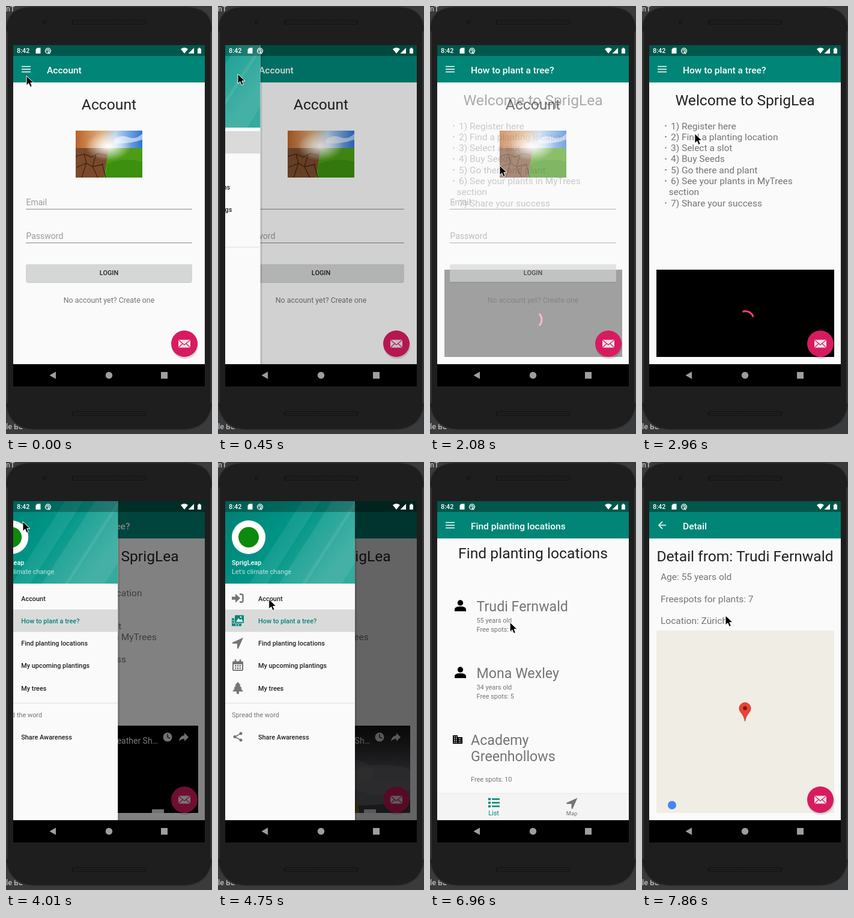
Animation of 343x711 px, one loop 8 s. Source, as an HTML page:

```html
<!DOCTYPE html>
<html lang="en">
<head>
<meta charset="utf-8">
<title>Tree planting app</title>
<style>
html, body { margin: 0; width: 100%; height: 100%; overflow: hidden; background: #3a3b3d; }
svg { display: block; width: 343px; height: 711px; font-family: Roboto, sans-serif; }
</style>
</head>
<body>
<svg id="stage" viewBox="0 0 343 711"></svg>
<script>
const LOOP = 8000, STEP = LOOP / 54;
const DARK = '#212121', GREY = '#757575', TEAL = '#008577', PINK = '#d81b60';

// Markup helpers; a label's y is the middle of its capitals.
const label = (x, y, size, str, fill = GREY, attrs = '') =>
  `<text x="${x}" y="${y + size * .355}" font-size="${size}" fill="${fill}" ${attrs}>${str}</text>`;
const centred = (y, size, str, fill, attrs = '') => label(171.5, y, size, str, fill, 'text-anchor="middle" ' + attrs);
const medium = 'font-weight="500"';
const box = (x, y, w, h, fill, attrs = '') => `<rect x="${x}" y="${y}" width="${w}" height="${h}" fill="${fill}" ${attrs}/>`;
const disc = (x, y, r, fill, attrs = '') => `<circle cx="${x}" cy="${y}" r="${r}" fill="${fill}" ${attrs}/>`;
const path = (d, fill, attrs = '') => `<path d="${d}" fill="${fill}" ${attrs}/>`;
const line = (d, stroke, width, attrs = '') => path(d, 'none', `stroke="${stroke}" stroke-width="${width}" ${attrs}`);
const group = (id, content, attrs = '') => `<g id="${id}" ${attrs}>${content}</g>`;
const at = (x, y, content) => `<g transform="translate(${x} ${y})">${content}</g>`;
const gradient = (id, stops, attrs = '') => `<linearGradient id="${id}" ${attrs}>` +
  stops.map(([offset, color]) => `<stop offset="${offset}" stop-color="${color}"/>`).join('') + '</linearGradient>';
const clip = (id, x, y, w, h) => `<clipPath id="${id}">${box(x, y, w, h, '#000')}</clipPath>`;

const arrowIcon = 'M9-9L-9-1Q-10 1-8 1H-1V8Q-1 10 1 9Z';
const icons = [
  c => path('M-10-2.5h6v-5l8 7.5-8 7.5v-5h-6z', c) + line('M3-6.5h3q2.5 0 2.5 2.5v8q0 2.5-2.5 2.5h-3', c, 2.5),
  c => box(-5, -9, 15, 13, c, 'rx="1"') + path('M-10-4h4v9h12v4h-16z', c) +
    path('M-3 2l4-6 3 3 2-2 3 5z', '#fafafa') + disc(5, -6, 1.3, '#fafafa') +
    line('M-8-1v2m0 2v2m4 2h2m2 0h2', '#fafafa', 1.4),
  c => path(arrowIcon, c),
  c => box(-9, -7, 18, 16, c, 'rx="2"') + box(-7, -2, 14, 9, '#fafafa') + line('M-4-10v4M4-10v4', c, 2.5) +
    line('M-5 0.5h10M-5 4.5h10', c, 2.5, 'stroke-dasharray="2.4 1.4"'),
  c => path('M0-10l5 6h-2l4 5h-2l4 5h-7v4h-4v-4h-7l4-5h-2l4-5h-2z', c),
];
const shareIcon = line('M5-5.5L-5 0 5 5.5', GREY, 1.6) + disc(5, -5.5, 2.5, GREY) + disc(-5, 0, 2.5, GREY) + disc(5, 5.5, 2.5, GREY);
const menu = ['Account', 'How to plant a tree?', 'Find planting locations', 'My upcoming plantings', 'My trees'];
const rowTop = i => 207.8 + i * 37.25;

const speaker = y => box(109, y - 4, 125, 8, '#151515', 'rx="4"') +
  line(`M113 ${y - 1.5}H231M113 ${y + 1.5}H231`, '#303030', 1.5, 'stroke-dasharray="1.5 1.5"');

const phone = label(0, 5, 12.5, 'nT', '#bbb', medium) + label(0, 699, 12.5, 'le Bu', '#bbb', medium) +
  path('M0 32Q5 2 42 1H301Q338 2 343 32V664Q337 702 298 704H45Q6 702 0 664Z', '#1e1e1e', 'stroke="#343434" stroke-width="2"') +
  line('M1.5 42V660M341.5 42V660', '#3a3a3a', 2) + disc(64, 27, 3, '#121212') + disc(64, 27, 1.2, '#2c2c2c') +
  speaker(27) + speaker(677);

const photo = '<g clip-path="url(#photoClip)">' + box(116, 207, 111, 78, 'url(#photoSky)') +
  path('M116 236H171V285H116Z', '#7a4a2b') + path('M171 236H227V285H163Z', '#4c9c16') +
  line('M116 250l14-4 12 5 11-6 14 3M118 268l16-7 10 6 18-4M130 246l4 15-8 24M150 246l-6 21 9 18M160 262l6 23', '#3d2214', 1.3) +
  path('M180 222q12-9 24-4t23-6v10q-24 8-47 6z', '#fff', 'opacity=".55"') +
  path('M168 262q30-12 59-3v26H166z', '#358a0c', 'opacity=".7"') +
  '<ellipse cx="170" cy="233" rx="38" ry="24" fill="url(#glow)"/></g>';

const field = (y, str) => label(33.5, y, 14, str, '#9b9b9b') + box(33, y + 11, 277, 1, '#888');
const account = centred(163, 24.7, 'Account', DARK) + photo + field(326, 'Email') + field(382, 'Password') +
  box(34, 431, 275, 29, '#000', 'rx="2" opacity=".18"') + box(33, 429, 277, 29.5, '#d5d6d6', 'rx="2"') +
  centred(443, 10.9, 'LOGIN', DARK, medium) + centred(489, 12.4, 'No account yet? Create one');

const steps = ['1) Register here', '2) Find a planting location', '3) Select a slot', '4) Buy Seeds',
  '5) Go there and plant', '6) See your plants in MyTrees', 'section', '7) Share your success'];
const stepLine = (str, i) => {
  const y = 199 + i * 18.3;
  return str === 'section' ? label(44.5, y, 15.5, str) : disc(39.5, y, 1.2, GREY) + label(48, y, 15.5, str);
};
const scene = box(24, 438, 296, 145, 'url(#storm)') +
  [[60, 520, 58], [130, 535, 50], [205, 515, 54], [275, 528, 60]].map(([x, y, r]) =>
    `<ellipse cx="${x}" cy="${y}" rx="${r}" ry="${r * .42}" fill="#b3b2ba" opacity=".6"/>`).join('') +
  path('M24 572q60-12 140-4t156-6v22H24z', '#62636a') +
  [90, 150, 222, 231].map(x => path(`M${x} 556l4 27h-8z`, '#b8a334')).join('');
const player = group('scene', scene) + box(24, 438, 296, 145, 'url(#shade)') +
  disc(47, 463, 14, '#777') + label(253, 463, 14, 'A Short Story of Weather Sh…', '#eee', 'text-anchor="end"') +
  disc(269, 457, 7.5, '#ddd') + line('M269 452v5l4 2', '#333', 1.6) +
  path('M297 450l7 7-7 7v-4q-6 0-9 4 1-9 9-10z', '#ddd') + box(243, 577, 20, 6, '#ddd');
const howTo = centred(156.5, 24.6, 'Welcome to SprigLea', DARK) + steps.map(stepLine).join('') +
  '<g clip-path="url(#videoClip)">' + box(24, 438, 296, 145, '#000') + group('player', player) +
  group('spinner', line('M181.9 511.1A14 14 0 0 1 181.9 530.9', '#ff4081', 3)) + '</g>';

const person = disc(0, -5, 4.7, '#000') + path('M-9.5 9V6Q-9.5 1 0 1T9.5 6V9Z', '#000');
const host = (y, name, age, spots) => at(50.5, y - 1, person) + label(77.5, y, 23.2, name) +
  label(77.5, y + 23, 10.9, age + ' years old') + label(77.5, y + 38, 10.9, 'Free spots: ' + spots);
const office = path('M-8-7H0V-4H8V7H-8Z', '#000') +
  line('M-6-4.5H-1M-6-1.5H-1M-6 1.5H-1M-6 4.5H-1M2-1.5H6M2 1.5H6M2 4.5H6', '#fff', 1.3, 'stroke-dasharray="1.6 1.4"');
const list = centred(151, 24.7, 'Find planting locations', DARK) +
  host(240, 'Trudi Fernwald', 55, 7) + host(351, 'Mona Wexley', 34, 5) +
  at(46, 461, office) + label(68, 462, 23.2, 'Academy') + label(68, 489, 23.2, 'Greenhollows') +
  label(68, 527, 10.9, 'Free spots: 10') +
  box(12, 550, 319, 45, '#f4f4f4') + box(12, 550, 319, 1, '#e8e8e8') +
  line('M97 560h4M97 566h4M97 572h4', TEAL, 3.5) + line('M103 560h13M103 566h13M103 572h13', TEAL, 2.5) +
  label(106, 583, 10.9, 'List', TEAL, 'text-anchor="middle"') +
  at(236.5, 567, path(arrowIcon, GREY)) + label(236, 584, 9.3, 'Map', GREY, 'text-anchor="middle"');

const detail = centred(156.5, 24.6, 'Detail from: Trudi Fernwald', DARK) +
  label(31, 190.5, 15.5, 'Age: 55 years old') + label(31, 227, 15.5, 'Freespots for plants: 7') +
  label(31, 263.5, 15.5, 'Location: Zürich') + box(24, 280, 296, 303, '#f0ede5') +
  path('M171.5 431Q170 422 164.500 416A9.700 9.700 0 1 1 178.500 416Q173 422 171.500 431Z', '#ea4335', 'stroke="#b8281c" stroke-width=".6"') +
  disc(171.5, 409, 3.3, '#7d1610') + disc(50, 570, 7, '#4285f4');

const fab = disc(1, 3, 22.3, '#000', 'opacity=".13"') + disc(0, 0, 22, PINK) +
  box(-10, -6.500, 20, 13, '#e9e4e6', 'rx="1"') + line('M-9.500-6L0 2 9.500-6M-9.500 6L-3 0M9.500 6L3 0', PINK, 1.2);

const drawer = box(216, 65, 3, 530, '#000', 'opacity=".12" transform="translate(12)"') +
  box(12, 65, 216, 530, '#fafafa') + box(12, 65, 216, 137, 'url(#header)') +
  [[228, 66], [190, 44], [140, 30]].map(([x, w]) =>
    path(`M${x} 65h${w}L${x + w - 88} 202h${-w}Z`, '#fff', 'opacity=".08" clip-path="url(#headerClip)"')).join('') +
  box(12, 65, 216, 18, '#000', 'opacity=".28"') +
  disc(51, 125, 28, '#fff') + disc(51, 125, 17, '#0b8a0b') +
  label(23, 167, 10.9, 'SprigLeap', '#fff', medium) + label(23, 182.5, 10.9, "Let's climate change", '#c3e4e0') +
  box(12, 0, 216, 37.25, '#dadada', 'id="highlight"') + box(12, 0, 216, 37.25, '#000', 'id="ripple"') +
  menu.map((str, i) => `<g class="item" color="${DARK}">` +
    at(33, rowTop(i) + 18.5, `<g class="icon" color="${GREY}">${icons[i]('currentColor')}</g>`) +
    label(67, rowTop(i) + 19, 10.9, str, 'currentColor', medium) + '</g>').join('') +
  box(12, 400, 216, 1, '#dfdfdf') + label(23, 420, 10.9, 'Spread the word') +
  at(33, 456.500, shareIcon) + label(67, 457, 10.9, 'Share Awareness', DARK, medium);

const status = label(18, 74.5, 10.9, '8:42', '#fff', medium) +
  path('M52 69.500h5.500v9.500h-8v-7z', '#fff') + disc(70, 74.500, 4.400, 'none', 'stroke="#fff" stroke-width="1.4"') +
  line('M68 74.500a2 2 0 1 1 2 2l3 3', '#fff', 1.3) +
  path('M291 71.500q6-4.500 12 0l-6 7.500z', '#fff') + path('M313 69.500v9.500h-9.500z', '#fff') + path('M319 71h1.500v-1.500h3v1.500h1.500v8h-6z', '#fff');

const stage = document.getElementById('stage');
stage.innerHTML = '<defs>' + clip('screenClip', 12, 65, 319, 530) + clip('photoClip', 116, 207, 111, 78) +
  clip('videoClip', 24, 438, 296, 145) + clip('headerClip', 12, 65, 216, 137) +
  gradient('photoSky', [[0, '#b9622a'], [.4, '#e0b07e'], [.6, '#b8d4f0'], [1, '#2f74cf']]) +
  gradient('storm', [[0, '#55555c'], [.5, '#8d8c95'], [1, '#9b9aa2']], 'x2="0" y2="1"') +
  gradient('shade', [[0, '#0009'], [.5, '#0000']], 'x2="0" y2="1"') +
  gradient('header', [[0, '#007f72'], [.55, '#009688'], [1, '#35aa9e']], 'y2=".5"') +
  '<radialGradient id="glow"><stop stop-color="#fff"/><stop offset="1" stop-color="#fff" stop-opacity="0"/></radialGradient></defs>' +
  phone + box(12, 65, 319, 567, '#000') +
  '<g clip-path="url(#screenClip)">' + box(12, 65, 319, 530, '#fafafa') +
  group('detail', detail) + group('list', list) + group('howTo', howTo) + group('account', account) + group('fab', fab) +
  box(12, 83, 319, 44, TEAL) + box(12, 65, 319, 18, '#00574b') +
  line('', '#fff', 1.7, 'id="navIcon"') + label(68, 106, 15.5, '', '#fff', medium + ' id="title"') +
  box(12, 65, 319, 530, '#000', 'id="scrim"') + group('drawer', drawer) + status + '</g>' +
  path('M83 607.500v12l-10.500-6z', '#9e9e9e') + disc(171.500, 613.500, 5.700, '#9e9e9e') + box(258, 608, 11, 11, '#9e9e9e') +
  path('M0 0V16L3.800 12.500 6.300 18.500 9.300 17.200 6.800 11.500H12Z', '#000', 'id="cursor" stroke="#fff" stroke-width="1"');

const el = Object.fromEntries([...stage.querySelectorAll('[id]')].map(node => [node.id, node]));
const items = [...stage.querySelectorAll('.item')];
const set = (node, attrs) => { for (const key in attrs) node.setAttribute(key, attrs[key]); };

const ramp = (t, start, duration) => Math.min(1, Math.max(0, (t - start) / duration));
const easeOut = (t, start) => 1 - (1 - ramp(t, start, 400)) ** 5;
const smooth = u => u * u * (3 - 2 * u);

// Cursor stops: time, x, y
const stops = [[0, 34, 116], [148, 33, 113], [740, 33, 113], [1334, 116, 265], [2400, 116, 265], [3500, 28, 99],
  [4300, 28, 99], [5037, 116, 299], [6520, 116, 299], [6960, 139, 255], [LOOP, 139, 255]];
function cursorAt(t) {
  const i = Math.max(1, stops.findIndex(stop => stop[0] >= t));
  const [t0, x0, y0] = stops[i - 1], [t1, x1, y1] = stops[i];
  const u = smooth(ramp(t, t0, t1 - t0));
  return [x0 + (x1 - x0) * u, y0 + (y1 - y0) * u];
}

function draw(now) {
  const t = Math.floor(now % LOOP / STEP + 1e-6) * STEP;

  const toHowTo = ramp(t, 1965, 300), toList = ramp(t, 5850, 300), toDetail = ramp(t, 7480, 300);
  const opacity = { account: 1 - toHowTo, howTo: toHowTo - toList, list: toList - toDetail, detail: toDetail };
  for (const id in opacity) set(el[id], { opacity: opacity[id] });
  set(el.fab, { transform: `translate(297 561) scale(${1 - opacity.list})` });

  const loaded = t >= 2900;
  set(el.player, { opacity: +loaded });
  set(el.scene, { opacity: ramp(t, 4350, 600) });
  set(el.spinner, { opacity: +!loaded, transform: `rotate(${(t - 2074) * .4} 172 521)` });

  const selected = t < 1930 ? 0 : t < 5630 ? 1 : 2;
  el.title.textContent = t >= 7500 ? 'Detail' : menu[selected];
  set(el.navIcon, { d: t >= 7500 ? 'M40 105H28M34 99L28 105 34 111' : 'M26 100.500H41M26 105H41M26 109.500H41' });

  const open = t < 1930 ? easeOut(t, 420) : t < 2074 ? 1 : t < 3888 ? 0 : easeOut(t, 3888) - easeOut(t, 5764);
  set(el.drawer, { transform: `translate(${(open - 1) * 216})`, visibility: open > .001 ? 'visible' : 'hidden' });
  set(el.scrim, { opacity: .6 * open });
  set(el.highlight, { y: rowTop(selected) });
  const press = t < 3000 ? ramp(t, 1560, 220) : t < 5630 ? ramp(t, 5260, 220) : 0;
  set(el.ripple, { y: rowTop(t < 3000 ? 1 : 2), opacity: selected === (t < 3000 ? 1 : 2) ? 0 : .12 * press });
  items.forEach((item, i) => {
    set(item, { color: i === selected ? TEAL : DARK });
    set(item.querySelector('.icon'), { color: i === selected ? TEAL : GREY });
  });

  set(el.cursor, { transform: `translate(${cursorAt(t)})` });
}

const start = performance.now();
(function frame() {
  draw(performance.now() - start);
  requestAnimationFrame(frame);
})();
</script>
</body>
</html>
```
